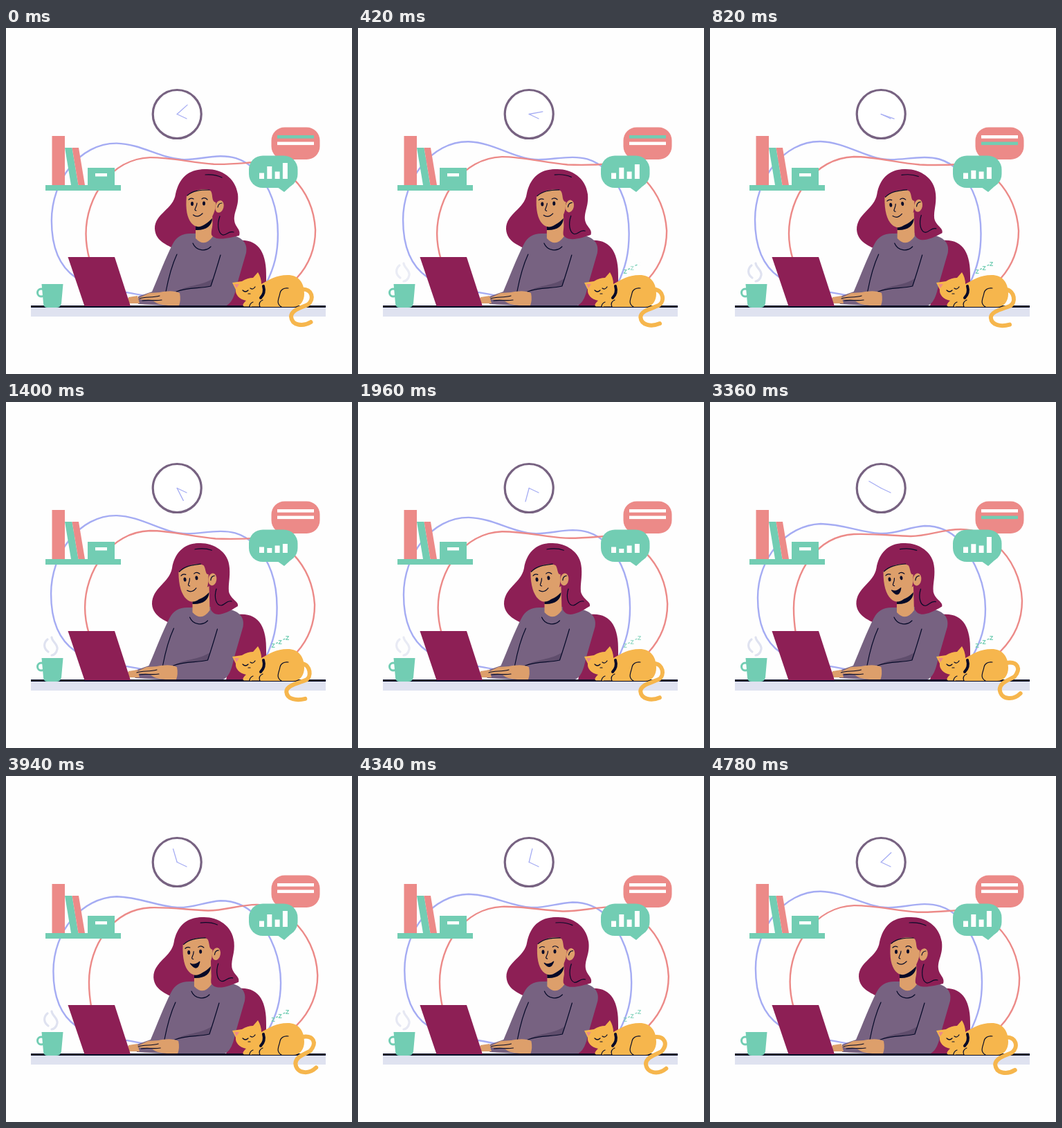
Animation of 500x500 px, one loop 4800 ms. Source, as an HTML page:

```html
<!DOCTYPE html>
<html lang="en">
<head>
<meta charset="utf-8">
<title>Working at the desk</title>
<style>
  html, body { margin: 0; height: 100%; overflow: hidden; background: #fefefe; }
  svg { display: block; width: 100vw; height: 100vh; }
  .line { fill: none; stroke-linecap: round; stroke-linejoin: round; }
  .ink { stroke: #050a28; stroke-width: 1.2; }
  .green { fill: #72cdb3; }
  .red { fill: #ec8a88; }
  .wine { fill: #8d1f55; }
  .skin { fill: #dd9f6b; }
  .mauve { fill: #776281; }
  .cat { fill: #f6b64d; }
  .dark { fill: #050a28; }
  .pale { fill: #dfe2f0; }
  .white { fill: #fff; }
  text { font: bold 9px "Open Sans", sans-serif; fill: #72cdb3; }
</style>
</head>
<body>
<svg viewBox="0 0 500 500">
  <!-- data-to holds the second pose, data-by the track that blends towards it -->
  <g class="line" stroke-width="2.4">
    <path stroke="#a5acf3" data-by="sway"
      d="M256 190C225 188 195 165 160 164C105 163 65 220 65 277C65 320 78 345 100 360C130 378 170 380 200 387C280 400 350 400 375 370C387 345 391.500 325 391.500 297C391.500 262 382 230 360 207C340 187 320 187 310 187C290 187 275 191 256 190Z"
      data-to="M246 190C215 188 195 177 160 176C110 178 69 225 69 283C69 320 80 347 102 362C130 378 170 380 200 387C280 400 350 400 378 370C392 345 398 325 398 299C398 262 382 228 360 200C345 184 327 179 310 179C285 181 270 191 246 190Z"/>
    <path stroke="#ec8a88" data-by="sway"
      d="M303 197.500C270 195 240 186 208 186C150 188 114 245 114 297C114 310 116 322 120 335C125 360 140 385 200 398C330 400 390 395 420 362C437 343 446 320 446 293C444 262 432 238 415 220C400 203 385 196 365 196.500C345 198 325 198.500 303 197.500Z"
      data-to="M290 194C262 193 235 190 208 191C155 194 121 245 121 298C121 312 122 322 124 335C130 360 140 385 200 398C330 400 390 395 420 360C440 340 451 315 451 287C450 255 435 225 415 208C402 192 385 184 362 184C335 184 315 194 290 194Z"/>
  </g>

  <g class="line" stroke="#a5acf3" stroke-width="1.3">
    <circle cx="247.2" cy="124.5" r="35" fill="#fff" stroke="#776281" stroke-width="3.2"/>
    <path d="M247.2 124.5L261 131"/>
    <path id="minute" d="M247.2 124.5V104.5"/>
  </g>

  <g class="green">
    <path d="M57 227H166V235H57ZM85 173H95.500L104.500 227H94ZM118 202H157V227H118Z"/>
    <path class="red" d="M66.500 156H85V227H66.500ZM95.500 173H105L114 227H104.500Z"/>
    <path class="white" d="M129 210H146V214.500H129Z"/>
  </g>

  <rect class="red" x="383.500" y="143.500" width="70" height="46.500" rx="19"/>
  <rect id="topLine" x="392" y="155" width="53" height="4.600"/>
  <rect id="lowLine" x="392" y="164.500" width="53" height="4.600"/>
  <g class="green">
    <rect x="351" y="184.500" width="70.500" height="46.500" rx="20"/>
    <path d="M392 230L402 237L412 228Z"/>
  </g>
  <path id="bars" class="white"/>

  <path class="wine" d="M335 307C365 304 377 325 376 360V402H318Z"/>
  <path class="wine" data-by="lean"
    d="M288 204C262 204 250 218 245 240C242 262 215 268 215 290C216 310 236 314 248 322L310 310L320 270L300 225Z"
    data-to="M279 204C256 204 243 220 240 240C236 262 211 268 211 292C212 312 236 318 246 324L306 310L310 270L290 225Z"/>

  <g id="body">
    <path class="mauve" d="M270 297C255 296 246 302 241 312C230 333 221 358 211 381L191 388V399L252 402H314C327 401 331 384 334 370L347 325C350 310 340 302 325 299L300 296Z"/>
    <path fill="#5f4d6c" d="M246 381C262 371 283 373 299 362L296 373C280 377 263 375 246 381Z"/>
    <path class="skin" d="M274 280L298 266L299 301Q287 318 274 304Z"/>
    <path class="dark" d="M274 284C283 288 291 282 298 275C298 286 288 293 274 292Z"/>
    <path class="line ink" d="M270 311C275 323 289 323 296 316M247 327C240 342 236 355 231 381M310 328C305 345 301 358 296 373C280 377 265 374 246 381"/>
  </g>
  <g class="head">
    <path class="skin" d="M261 242C259 262 262 275 268 282C274 289 281 288 287 284C296 278 300 270 302 262L305 240L285 230Z"/>
  </g>
  <path class="wine" data-by="lean"
    d="M261 243C270 233 285 232 295 234C300 240 296 250 303 252C308 258 306 266 301 272C299 285 296 293 297 299C304 309 323 303 337 300C340 291 331 288 330 278C329 265 337 258 335 240C331 215 310 203 288 204C262 206 250 225 250 240Z"
    data-to="M251 245C260 235 273 234 284 234C290 240 287 250 293 249C298 256 300 263 296 270C298 285 295 293 296 300C302 312 316 307 335 295C337 288 325 286 322 274C321 262 324 255 323 240C322 215 298 203 279 204C256 206 242 226 243 242Z"/>
  <path class="line ink" data-by="lean"
    d="M309 272C305 283 306 296 313 299C319 300 321 293 329 295"
    data-to="M304 270C300 283 304 294 311 294C317 293 319 286 326 288"/>
  <g class="head">
    <ellipse class="skin" cx="308.500" cy="258" rx="6" ry="9" transform="rotate(14 308.500 258)"/>
    <g class="line ink">
      <path d="M306 259Q307 253 312 253M288 212Q302 211 312 216M262 242C270 235 280 234 294 234M264 248Q267 245 271 247M283 247Q287 244 291 248M276 253C276 259 270 263 275 264"/>
      <path id="mouth" class="dark"/>
    </g>
    <ellipse class="dark" cx="269" cy="254" rx="2" ry="3"/>
    <ellipse class="dark" cx="286" cy="253.500" rx="2" ry="3"/>
  </g>

  <path class="skin" d="M177 389L190 387L193 398H177Z"/>
  <g id="hand">
    <path class="skin" d="M251 383C243 379 232 380 222 382L207 383L191 390.500C195 394 205 392 213 394.500C219 400 232 402 250 401Q253 393 251 383Z"/>
    <path class="line ink" d="M193 391C202 388 211 390 222 387M197 394C207 392 214 395 225 393"/>
  </g>

  <path class="pale" d="M36 403H462V417H36Z"/>
  <path class="dark" d="M36 401H462V404H36Z"/>
  <path class="wine" d="M89.500 331H157L180 402H113.500Z"/>

  <path class="green" d="M51.500 370H82.500L80 398Q79 404 73 404H60Q54 404 54 398Z"/>
  <ellipse class="line" cx="51" cy="382.500" rx="5.500" ry="5.500" stroke="#72cdb3" stroke-width="3"/>
  <path id="steam" class="line" stroke="#dfe2f0" stroke-width="3.200" d="M60 343C54 348 54 356 61 361M66 340C67 347 75 350 74 357C73 363 69 366 66 366"/>

  <path class="line" stroke="#f6b64d" stroke-width="6" data-by="tail"
    d="M428 378C440 380 442 398 433 402C420 407 405 410 405 419C406 430 420 432 432 429"
    data-to="M428 377C445 374 450 385 440 397C430 403 420 405 419 415C420 430 438 432 449 421"/>
  <path class="cat" d="M327 368L341 366Q349 361 357 361L364 353Q369 361 369 370C380 364 390 357 407 357C422 357 431 367 431 384C431 395 425 403 415 403H344C340 400 345 396 347 394C337 392 331 385 332 378Z"/>
  <path class="red" d="M330 370L337 370L333 376Z"/>
  <path class="line ink" d="M342 379Q346 383 350 379M353 376Q357 379 360 374M350 384L353 384M398 403C389 398 395 390 396 383C397 378 402 375 408 376M343 403H352Q352 398 357 396M355 403H367Q364 396 371 393"/>
  <path class="line" stroke="#050a28" stroke-width="4" d="M372 373Q375 383 368 390"/>
  <g id="snore">
    <text x="383.500" y="355">Z</text>
    <text x="393.500" y="349.500">Z</text>
    <text x="404" y="344">Z</text>
    <path class="green" d="M390 348L393 347V348.500L390 349.500ZM400.500 342.500L403.500 341.500V343L400.500 344Z"/>
  </g>
</svg>
<script>
const LOOP = 4800, HALF = LOOP / 2;
const $ = id => document.getElementById(id);
const heads = document.querySelectorAll(".head");
const numbers = s => s.match(/[\d.]+/g).map(Number);
const morphs = [...document.querySelectorAll("[data-to]")].map(el => ({
  el, by: el.dataset.by, from: el.getAttribute("d"), to: numbers(el.dataset.to)
}));

// Eased 0..1 between two times
const ease = (t, a, b) => {
  const k = Math.min(1, Math.max(0, (t - a) / (b - a)));
  return (1 - Math.cos(Math.PI * k)) / 2;
};
// Rises over a..b, falls back over c..d
const pulse = (t, a, b, c, d) => ease(t, a, b) - ease(t, c, d);

function draw(t) {
  const lean = pulse(t, 0, 1250, 3000, 4780);
  const late = t < 600 ? t + LOOP : t;
  const track = {
    lean,
    sway: pulse(late, 1250, 3450, 3450, 5400),
    tail: (1 - Math.sin(2 * Math.PI * t / LOOP)) / 2
  };
  for (const { el, by, from, to } of morphs) {
    let i = 0;
    el.setAttribute("d", from.replace(/[\d.]+/g, n => (+n + (to[i++] - n) * track[by]).toFixed(2)));
  }

  $("minute").setAttribute("transform", `rotate(${48 + 360 * t / LOOP} 247.2 124.5)`);
  $("body").setAttribute("transform", `translate(${-4.5 * lean})`);
  $("hand").setAttribute("transform", `translate(${-4 * lean})`);
  heads.forEach(h => h.setAttribute("transform", `rotate(${-6 * lean} 288 355)`));

  const open = 9 * pulse(t, 2700, 3200, 4200, 4600);
  $("mouth").setAttribute("d", `M270.500 270Q277 ${275 - open / 8} 284 268Q${277 + open / 3} ${275 + open} 270.500 270Z`);

  const tops = [209.5, 200 + 12 * pulse(t, 0, 1700, 2600, 4000), 207.5, 195 + 10 * pulse(t, 0, 1400, 2500, 3300)];
  $("bars").setAttribute("d", tops.map((y, i) => `M${366 + i * 11.3} 218V${y}h7V218Z`).join(""));

  const phase = t % HALF;
  $("topLine").setAttribute("class", phase < 600 ? "green" : "white");
  $("lowLine").setAttribute("class", phase >= 600 && phase < 1200 ? "green" : "white");
  $("steam").setAttribute("opacity", pulse(phase, 150, 600, 1800, 2250));
  [...$("snore").children].forEach((el, i) =>
    el.setAttribute("opacity", pulse(phase, 100 + i % 3 * 150, 400 + i % 3 * 150, 1800, 2250)));
}

function frame(now) {
  draw(now % LOOP);
  requestAnimationFrame(frame);
}
draw(0);
requestAnimationFrame(frame);
</script>
</body>
</html>
```
